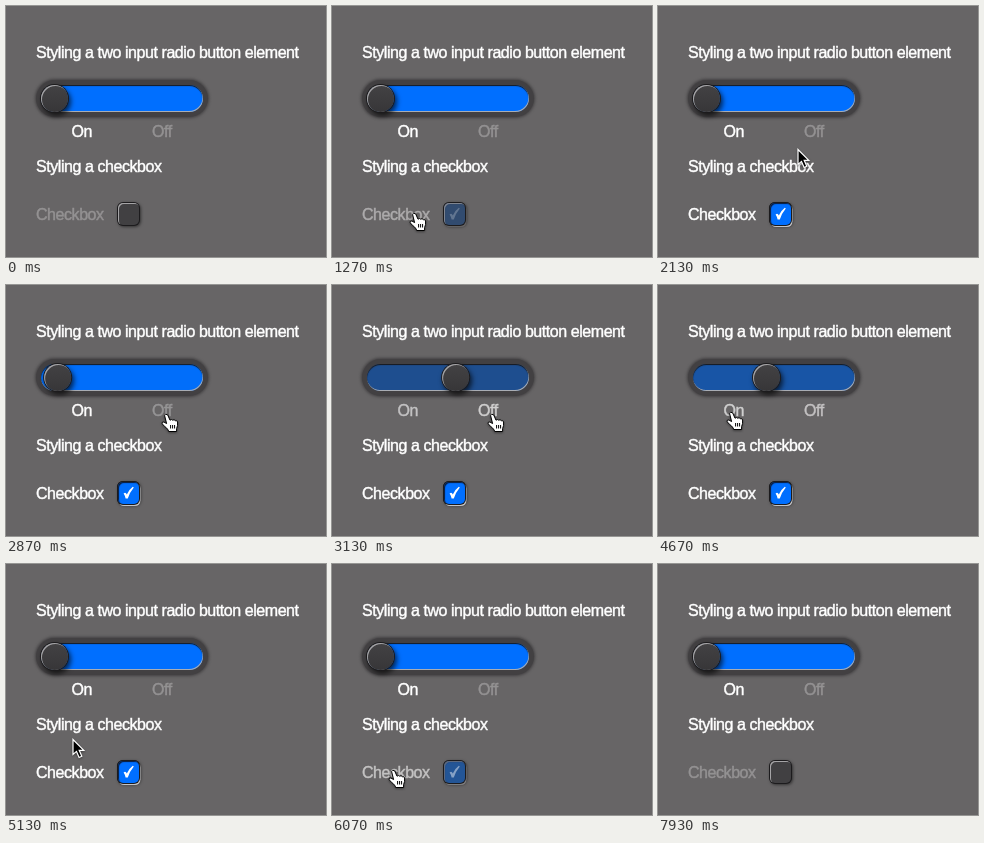
An HTML page that plays this animation: 320x251 px, repeating every 9.27 s.

```html
<!DOCTYPE html>
<html lang="en">
<head>
<meta charset="utf-8">
<title>Styled radio switch and checkbox</title>
<style>
  html, body { margin: 0; width: 100%; height: 100%; overflow: hidden; background: #676566; }
  #stage {
    --on: 1; --check: 0;
    --blue: #006fff; --dark: #353436; --dim: #949293;
    position: relative; width: 320px; height: 251px; overflow: hidden; background: #676566;
  }
  #stage > * { position: absolute; box-sizing: border-box; }
  .track {
    left: 35px; top: 79px; width: 162px; height: 27px; border-radius: 14px;
    background: color-mix(in srgb, var(--blue) calc(var(--on) * 100%), var(--dark));
    box-shadow: inset -.5px -1px 0 #a9adb4, inset 0 1px 1px #18181a,
      0 0 0 5px #424042, 0 0 3px 6px #424042;
  }
  .knob {
    left: 35px; top: 79px; width: 27px; height: 27px; border-radius: 50%;
    background: linear-gradient(#434244, #373638);
    box-shadow: inset 1px 1px .5px #a5a4a6, 0 0 0 1px #1c1b1d, 2px 3px 5px 1px rgba(0, 0, 0, .65);
    transform: translateX(calc((1 - var(--on)) * 135px));
  }
  .box { left: 112px; top: 197px; width: 21px; height: 22px; border-radius: 5px; }
  .raised {
    background: #414042;
    box-shadow: inset 1px 1px .5px #a5a4a6, 0 0 0 1px #1c1b1d, 1px 1px 3px 1px rgba(0, 0, 0, .5);
  }
  .pressed {
    background: var(--blue); opacity: var(--check);
    box-shadow: inset 1px 1px 1px #0a1a38, 0 0 0 1px #1c1b1d, 1px 1.5px 0 .5px #c4c4c6;
  }
  svg { left: 0; top: 0; }
  text {
    font: 16px "Liberation Sans", Arial, sans-serif; letter-spacing: -.44px;
    fill: #fff; stroke: #fff; stroke-width: .45px;
  }
  .state {
    --mix: color-mix(in srgb, #fff calc(var(--p) * 100%), var(--dim));
    fill: var(--mix); stroke: var(--mix);
  }
  .tick { fill: #fff; opacity: var(--check); }
  #cursor { filter: drop-shadow(0 1px 1px rgba(0, 0, 0, .4)); }
  #arrow { fill: #000; stroke: #fff; stroke-width: 1.2; }
  #hand { fill: #fff; stroke: #000; stroke-width: 1; stroke-linejoin: round; }
</style>
</head>
<body>
<div id="stage">
  <div class="track"></div>
  <div class="knob"></div>
  <div class="box raised"></div>
  <div class="box pressed"></div>
  <svg width="320" height="251">
    <text x="30" y="52">Styling a two input radio button element</text>
    <text class="state" style="--p: var(--on)" x="65.5" y="131">On</text>
    <text class="state" style="--p: calc(1 - var(--on))" x="146" y="131">Off</text>
    <text x="30" y="166">Styling a checkbox</text>
    <text class="state" style="--p: var(--check)" x="30" y="214">Checkbox</text>
    <path class="tick" d="M117.6 208.4Q119.8 206.6 120.8 209.6Q123 204.6 126.8 201.8L127.8 202.4Q123.6 207.4 121.8 213.4H119.6Q119 210.4 117.6 208.4Z"/>
    <g id="cursor">
      <path id="arrow" d="M0 .5V15.5L3.5 12.4L6.1 18.5L8.8 17.3L6.2 11.3H10.8Z"/>
      <g id="hand">
        <path d="M-2.4 1.6Q-1.4-.7.7.9L3 6.2Q4.5 4.8 5.7 6.2Q7.2 5 8.3 6.7Q10.1 6 10.6 8Q11 12 9.6 14.5V17.5H1.6L1 15.5Q-2 13-4.8 9.8Q-5.5 7.6-3.1 8L-.4 9.6Z"/>
        <path d="M3.6 11V14.5M5.6 11V14.5M7.6 11V14.5"/>
      </g>
    </g>
  </svg>
</div>
<script>
  const LOOP = 9270, TICK = 200 / 3, FADE = 500;
  const get = id => document.getElementById(id);
  const stage = get('stage'), cursor = get('cursor'), arrow = get('arrow'), hand = get('hand');
  const labels = [...document.querySelectorAll('.state')].map(el => el.getBBox());

  // pointer stops, and the moves between them along gentle arcs
  const enter = [100, 251], box = [83, 207], off = [161, 129],
        on = [74, 127], boxAgain = [62, 206], leave = [90, 251];
  const middle = (a, b) => a.map((v, i) => (v + b[i]) / 2);
  const move = (start, end, from, to, bend = middle(from, to)) => ({ start, end, from, to, bend });
  const moves = [
    move(200, 533, enter, box),
    move(1800, 2533, box, off, [127, 145]),
    move(3667, 4067, off, on, [128, 121]),
    move(4933, 5467, on, boxAgain),
    move(6133, 6333, boxAgain, leave)
  ];

  const ramp = (t, start, end = start + FADE) =>
    Math.min(1, Math.max(0, (t - start) / (end - start)));

  function pointer(t) {
    const m = moves.filter(m => m.start < t).pop();
    if (!m || m.to === leave && t > m.end - 1) return null;
    const k = 1 - (1 - ramp(t, m.start, m.end)) ** 2, r = 1 - k;
    return m.from.map((a, i) => Math.round(r * r * a + 2 * r * k * m.bend[i] + k * k * m.to[i]));
  }

  const inside = (r, x, y) => x >= r.x && x <= r.x + r.width && y >= r.y && y <= r.y + r.height;

  function draw(now) {
    // the picture advances 15 times a second
    const t = Math.floor((now % LOOP + 4) / TICK) * TICK;
    stage.style.setProperty('--on', 1 - ramp(t, 2855) + ramp(t, 4389));
    stage.style.setProperty('--check', ramp(t, 1150) - ramp(t, 5790));

    const tip = pointer(t);
    cursor.style.display = tip ? '' : 'none';
    if (tip) {
      const over = labels.some(r => inside(r, ...tip));
      arrow.style.display = over ? 'none' : '';
      hand.style.display = over ? '' : 'none';
      cursor.setAttribute('transform', `translate(${tip})`);
    }
  }

  const start = performance.now();
  function frame() {
    draw(performance.now() - start);
    requestAnimationFrame(frame);
  }
  frame();
</script>
</body>
</html>
```
